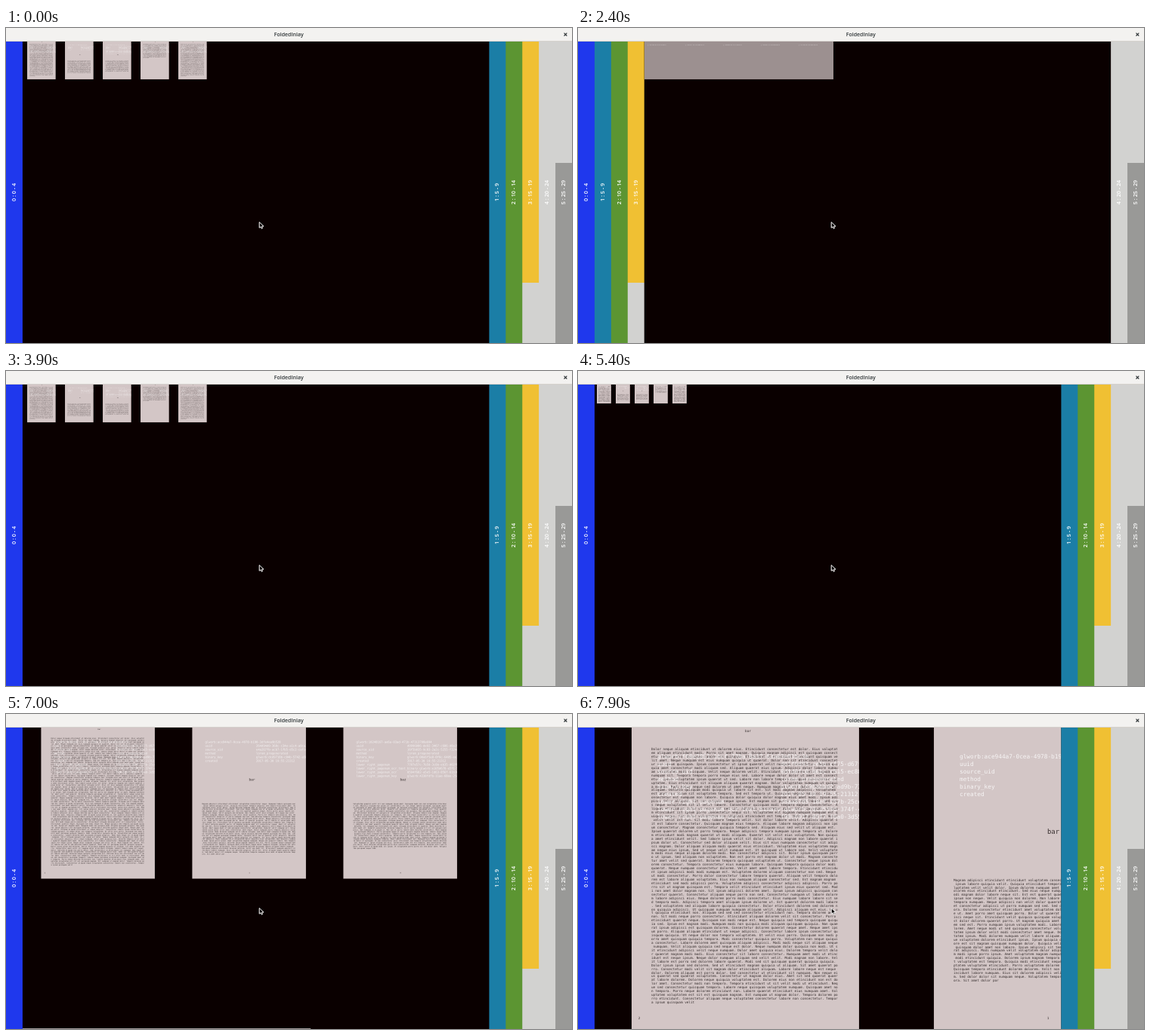
An HTML page with a canvas that plays this animation: 749 by 418 pixels, repeating every 8 s.

```html
<!DOCTYPE html>
<html lang="en">
<head>
<meta charset="utf-8">
<title>FoldedInlay</title>
<style>
html, body { margin: 0; width: 100%; height: 100%; overflow: hidden; background: #0a0000; }
canvas { display: block; width: 749px; height: 418px; }
</style>
</head>
<body>
<canvas id="stage" width="749" height="418"></canvas>
<script>
const W = 749, H = 418, TOP = 18, BAR = 21.92, LOOP = 8000;
const ctx = document.getElementById('stage').getContext('2d');
const MONO = '"DejaVu Sans Mono", monospace';
const SANS = '"Open Sans", "Noto Sans", sans-serif';
const PAPER = '#d3c6c6', VEIL = '#9c9090', TRACK = '#d2d2d0', INK = '#342c2c';

// Cell geometry at full zoom (16); lower zooms are fractions of it.
const CELL = { w: 400, h: 401, pad: 49, page: 301 };

const bars = [
  { label: '0 : 0 - 4', color: '#1f38ed', from: TOP, to: H },
  { label: '1 : 5 - 9', color: '#1b7ea6', from: TOP, to: H },
  { label: '2 : 10 - 14', color: '#5c9532', from: TOP, to: H },
  { label: '3 : 15 - 19', color: '#f0c033', from: TOP, to: 338 },
  { label: '4 : 20 - 24', color: TRACK, from: TOP, to: H },
  { label: '5 : 25 - 29', color: '#999997', from: 179, to: H }
];

// start time, open panel, zoom
const steps = [
  [0, 0, 2], [1300, 1, 2], [1800, 2, 2], [2400, 3, 2], [3000, 4, 2], [3200, 5, 2],
  [3900, 0, 2], [5400, 0, 1], [6200, 0, 2], [6300, 0, 4], [7000, 0, 8], [7100, 0, 16]
];

let seed = 41;
function rnd(n) {
  seed = (seed * 16807) % 2147483647;
  return Math.floor(seed / 2147483647 * n);
}

const words = ('dolor neque aliquam etincidunt ut dolorem eius consectetur est voluptatem porro quaerat ' +
  'modi labore tempora velit non sed quisquam numquam amet magnam adipisci ipsum quiquia sit').split(' ');

function prose(start, length) {
  let text = start;
  while (text.length < length) {
    const s = Array.from({ length: 4 + rnd(5) }, () => words[rnd(words.length)]).join(' ');
    text += s[0].toUpperCase() + s.slice(1) + '. ';
  }
  return text.slice(0, length);
}

const hex = n => Array.from({ length: n }, () => rnd(16).toString(16)).join('');
const uuid = () => [8, 4, 4, 4, 12].map(hex).join('-');

function metadata(rows, col, id) {
  const pairs = [
    ['uuid', uuid()], ['source_uid', uuid()], ['method', 'lorem_pregenerated'],
    ['binary_key', 'glworb:' + uuid()], ['created', '2017-05-30 19:55:21312'],
    ['lower_right_pagenum', uuid()],
    ['lower_right_pagenum_ocr_text_binary:', 'glworb:' + uuid()],
    ['lower_right_pagenum_ocr', uuid()], ['lower_right_pagenum_key', 'glworb:' + uuid()],
    ['binary_size', uuid()], ['format', uuid()]
  ];
  const lines = pairs.map(([k, v]) => k.padEnd(col) + v);
  return ['glworb:' + (id || uuid()), ...lines].slice(0, rows);
}

function newCanvas(w, h) {
  const c = document.createElement('canvas');
  c.width = w;
  c.height = h;
  return [c, c.getContext('2d')];
}

function makeCell(kind, o) {
  const [art, g] = newCanvas(CELL.w, CELL.h);
  const x = CELL.pad;
  g.textBaseline = 'middle';
  g.beginPath();
  g.rect(kind === 'veil' ? 0 : x, 0, kind === 'veil' ? CELL.w : CELL.page, CELL.h);
  g.clip();

  if (kind === 'page') {
    const y0 = o.title ? 202.5 : 29;
    g.fillStyle = INK;
    g.font = '4.32px ' + MONO;
    const text = prose(o.start || '', o.lines * 95 - 72);
    for (let i = 0; i < o.lines; i++) {
      g.fillText(text.slice(i * 95, i * 95 + 95), x + 26, y0 + i * 4.94);
    }
    g.textAlign = 'center';
    g.fillText(o.num, x + (o.title ? 151 : 10), 386);
    if (!o.title) g.fillText('bar', x + 154, 4.5);
    g.font = '8.8px ' + MONO;
    if (o.title) g.fillText(o.title, x + 158, 139);
    g.textAlign = 'left';
  }

  g.fillStyle = kind === 'page' ? 'rgba(255,255,255,.82)' : 'rgba(255,255,255,.9)';
  g.font = '7.74px ' + MONO;
  metadata(o.rows, o.col, o.id).forEach((line, i) => {
    g.fillText(line, kind === 'veil' ? 34 : x + 34, 38.5 + i * 10);
  });

  // Half-size copy for the thumbnails
  const [half, hg] = newCanvas(CELL.w / 2, Math.ceil(CELL.h / 2));
  hg.drawImage(art, 0, 0, CELL.w / 2, CELL.h / 2);
  return { kind, art, half };
}

const fullPage = (num, lines, start) => makeCell('page', { num, lines, start, rows: 9, col: 35 });
const chapter = (num, title, lines, rows, start, id) =>
  makeCell('page', { num, title, lines, rows, start, id, col: 29 });
const bare = () => makeCell('bare', { rows: 12, col: 29 });
const veils = n => Array.from({ length: n }, () => makeCell('veil', { rows: 1, col: 29 }));

const panels = [
  [
    fullPage('2', 69, 'Dolor neque aliquam etincidunt ut dolorem eius. Etincidunt consectetur est dolor. Eius voluptatem aliquam etincidunt modi. '),
    chapter('1', 'bar', 28, 6, 'Magnam adipisci etincidunt etincidunt voluptatem consectetur sequi. ',
      'ace944a7-0cea-4978-b190-3dfe4ea9b528'),
    chapter('0', 'baz', 25, 10, ''),
    fullPage('3', 30, ''),
    fullPage('4', 69, '')
  ],
  [fullPage('5', 69, ''), bare(), bare(), ...veils(2)],
  veils(5), veils(5), veils(5), veils(2)
];

function rect(color, x, y, w, h) {
  ctx.fillStyle = color;
  ctx.fillRect(x, y, w, h);
}

function drawCells(open, zoom, left) {
  const k = zoom / 16;
  ctx.imageSmoothingQuality = 'low';
  panels[open].forEach(({ kind, art, half }, i) => {
    const x = left + i * CELL.w * k, snap = Math.round(x);
    if (kind === 'page') rect(PAPER, x + CELL.pad * k, TOP, CELL.page * k, CELL.h * k);
    if (kind === 'veil') rect(VEIL, snap, TOP, CELL.w * k, CELL.h * k);
    if (k === 1) ctx.drawImage(art, snap, TOP);
    else ctx.drawImage(half, snap, TOP, half.width * k * 2, half.height * k * 2);
  });
}

function drawScrollbar(t, zoom, left, right) {
  const view = right - left, total = 5 * CELL.w * zoom / 16;
  if (total <= view) return;
  const fade = t < 7600 ? 1 : Math.max(0, 1 - (Math.floor((t - 7600) / 100) + 1) / 4);
  rect(`rgba(160,152,152,${fade})`, left, H - 1, view * view / total, 1);
}

// Each bar reaches a little under the next one, so no seam shows between them.
function drawGroup(first, last, x0) {
  const width = (last - first) * BAR;
  bars.slice(first, last).forEach((b, i) => {
    const x = x0 + i * BAR, w = Math.min(BAR + 1, width - i * BAR);
    rect(TRACK, x, TOP, w, b.from - TOP);
    rect(TRACK, x, b.to, w, H - b.to);
    rect(b.color, x, b.from, w, b.to - b.from);
  });
  bars.slice(first, last).forEach((b, i) => {
    ctx.save();
    ctx.translate(x0 + i * BAR + 13, 218);
    ctx.rotate(-Math.PI / 2);
    ctx.fillStyle = '#fff';
    ctx.fillText(b.label, 0, 0);
    ctx.restore();
  });
}

function drawBars(open, left, right) {
  // Cover cells that run under the right-hand bars
  rect('#0a0000', right, TOP, W - right, H - TOP);
  ctx.font = '600 7.2px ' + SANS;
  ctx.textAlign = 'center';
  ctx.textBaseline = 'alphabetic';
  drawGroup(0, open + 1, 0);
  drawGroup(open + 1, bars.length, right);
}

function drawTitle() {
  rect('#f3f2f0', 0, 0, W, 17);
  rect('#d5d1cd', 0, 17, W, 1);
  ctx.font = '600 7px ' + SANS;
  ctx.textAlign = 'center';
  ctx.fillStyle = '#2e3436';
  ctx.fillText('FoldedInlay', 374.3, 11);
  ctx.strokeStyle = '#2e3436';
  ctx.lineWidth = 1.2;
  ctx.beginPath();
  ctx.moveTo(738.5, 6.7);
  ctx.lineTo(742.3, 10.5);
  ctx.moveTo(742.3, 6.7);
  ctx.lineTo(738.5, 10.5);
  ctx.stroke();
}

const arrow = new Path2D('M335.2 257.6V265.2L337 263.7L338.2 266.2L339.6 265.6L338.5 263.1H341Z');

function drawCursor() {
  ctx.fillStyle = '#080404';
  ctx.fill(arrow);
  ctx.strokeStyle = '#fff';
  ctx.lineWidth = 1;
  ctx.stroke(arrow);
}

function draw(t) {
  const [, open, zoom] = steps.filter(s => s[0] <= t).pop();
  const left = (open + 1) * BAR;
  const right = W - (bars.length - 1 - open) * BAR;
  rect('#0a0000', 0, 0, W, H);
  drawScrollbar(t, zoom, left, right);
  drawCells(open, zoom, left);
  drawBars(open, left, right);
  drawTitle();
  drawCursor();
}

const begin = performance.now();
function tick() {
  draw((performance.now() - begin) % LOOP);
  requestAnimationFrame(tick);
}
tick();
</script>
</body>
</html>
```
